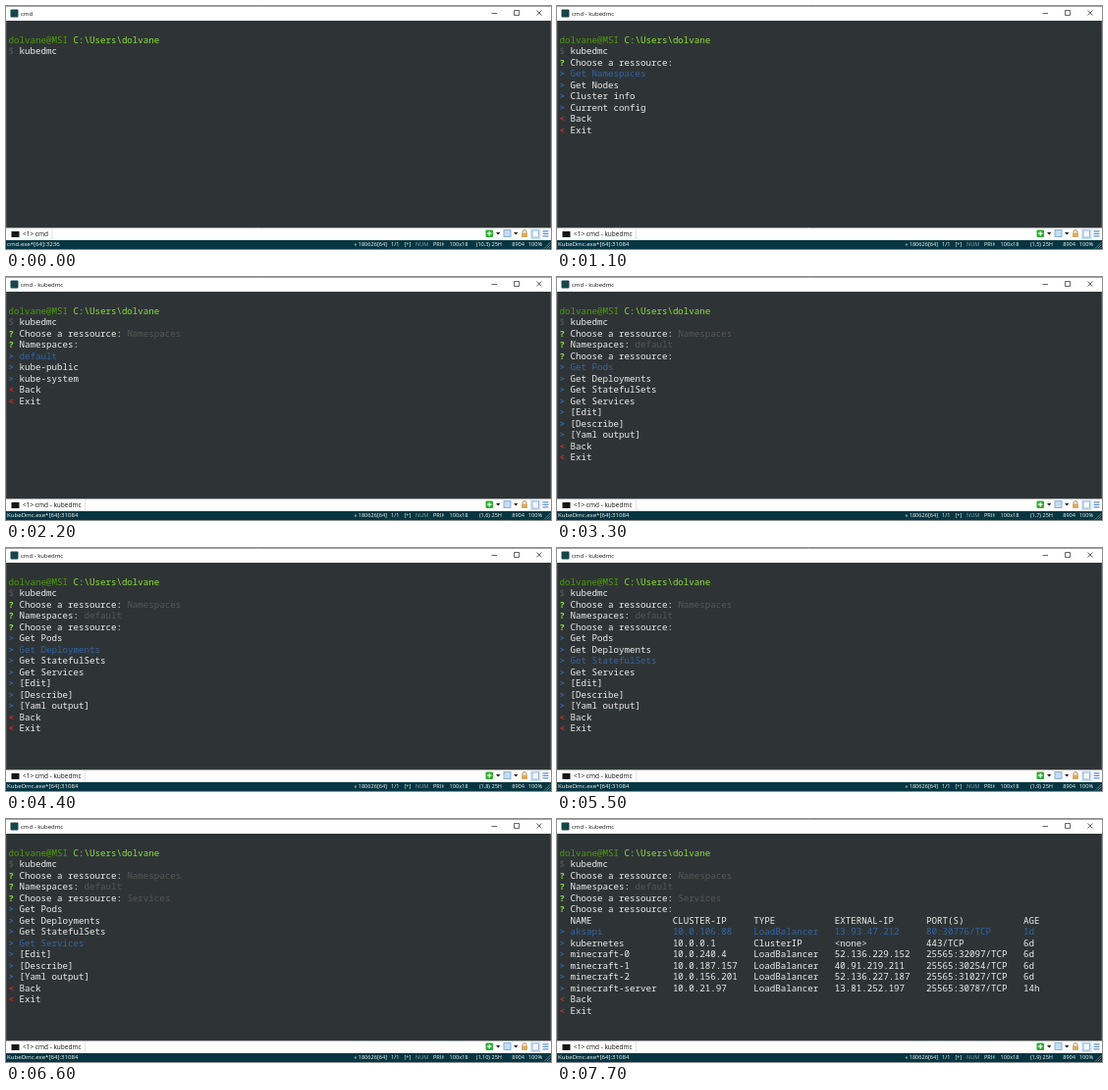
These frames come from a looping animation (555x248 px, 8000 ms). An HTML page:

```html
<!DOCTYPE html>
<html lang="en">
<head>
<meta charset="utf-8">
<title>Terminal menu</title>
<style>
  html, body { margin: 0; width: 100%; height: 100%; overflow: hidden; background: #2e3436; }
  svg { display: block; width: 100vw; height: 100vh; }
  text { white-space: pre; }
  .term { font: 500 9.16px "Noto Sans Mono", monospace; font-variant-ligatures: none; }
  .strong { font-weight: 700; }
  .ui { font-family: "Open Sans", sans-serif; fill: #111; }
  .status { font: 5.6px "Open Sans", sans-serif; }
  .status text:first-child { font-size: 6.1px; }
</style>
</head>
<body>
<svg viewBox="0 0 555 248" preserveAspectRatio="none">
  <rect width="555" height="248" fill="#2e3436"/>

  <!-- title bar -->
  <rect width="555" height="15" fill="#fff"/>
  <path d="M0 .5H555" stroke="#a5a5a5"/>
  <rect x="4.5" y="3.5" width="8" height="8" rx="1" fill="#17464b"/>
  <text id="title" class="ui" x="15" y="9.6" font-size="6"></text>
  <path d="M494.5 7.5h5.5M517.5 4.5h5v5h-5zM540.5 4.5l5 5m0-5l-5 5" fill="none" stroke="#333" stroke-width=".75"/>

  <g id="screen" class="term"></g>
  <path d="M.25 15V226M554.75 15V226" stroke="#777" stroke-width=".5"/>

  <!-- tab bar -->
  <rect y="226" width="555" height="13" fill="#fff"/>
  <path d="M0 226.5H555" stroke="#a5a5a5"/>
  <path id="tabEdge" stroke="#ddd" stroke-width=".8"/>
  <rect x="5.5" y="230" width="8" height="6" fill="#151515"/>
  <text id="tab" class="ui" x="17" y="235.3" font-size="6.5"></text>
  <rect x="488.5" y="228.5" width="7.5" height="7.5" rx="1" fill="#2fae2f"/>
  <path d="M490 232.2h4.5M492.25 230v4.5" stroke="#fff" stroke-width="1.2"/>
  <path d="M499 231h4.4l-2.2 2.4zM517 231h4.4l-2.2 2.4z" fill="#222"/>
  <rect x="507" y="228.5" width="7" height="7" fill="#c6dcf4" stroke="#7fa9d6" stroke-width=".9"/>
  <path d="M526 232v-1.5a2 2 0 0 1 4 0v1.5" fill="none" stroke="#b58f55"/>
  <rect x="525" y="231.5" width="6" height="4.5" fill="#d8ab62"/>
  <rect x="534" y="227.5" width="10.5" height="10.5" fill="#cfe5f8"/>
  <rect x="536" y="229" width="6.5" height="7" fill="#f5f9fe" stroke="#8fa8c6" stroke-width=".8"/>
  <path d="M546.5 229.8h6M546.5 232.3h6M546.5 234.8h6" stroke="#5a90cc" stroke-width="1.2"/>

  <!-- status bar -->
  <rect y="239" width="555" height="9" fill="#073642"/>
  <path d="M548 247.5l6.5-6.5M550.5 247.5l4-4M553 247.5l1.5-1.5" stroke="#7f979c" stroke-width=".7"/>
  <g id="status" class="status"></g>
</svg>

<script>
const $ = id => document.getElementById(id);
const SVG = "http://www.w3.org/2000/svg";
const GREEN = "#4e9a06", LIME = "#8ae234", GRAY = "#555753",
      WHITE = "#eeeeec", BLUE = "#3465a4", RED = "#d42a2a";
const STEP = 1100, LOOP = 8000;

// A terminal line is a list of [color, text, class] runs.
const mark = (color, symbol) => [color, symbol + " ", "strong"];
const ask = (question, answer = "") => [mark(LIME, "?"), [WHITE, question + ": "], [GRAY, answer]];
const choose = answer => ask("Choose a ressource", answer);
const menu = (items, selected) => [
  ...items.map((item, i) => [mark(BLUE, ">"), [i === selected ? BLUE : WHITE, item]]),
  ...["Back", "Exit"].map(item => [mark(RED, "<"), [WHITE, item]])
];

const columns = [19, 15, 15, 17, 18, 3];
const tableRow = cells => cells.split(" ").map((cell, i) => cell.padEnd(columns[i])).join("");

const prompt = [
  [[GREEN, "dolvane@MSI "], [LIME, "C:\\Users\\dolvane"]],
  [[GRAY, "$ "], [WHITE, "kubedmc"]]
];
const main = ["Get Namespaces", "Get Nodes", "Cluster info", "Current config"];
const namespaces = ["default", "kube-public", "kube-system"];
const resources = ["Get Pods", "Get Deployments", "Get StatefulSets", "Get Services",
                   "[Edit]", "[Describe]", "[Yaml output]"];
const services = [
  "aksapi 10.0.106.88 LoadBalancer 13.93.47.212 80:30776/TCP 1d",
  "kubernetes 10.0.0.1 ClusterIP <none> 443/TCP 6d",
  "minecraft-0 10.0.240.4 LoadBalancer 52.136.229.152 25565:32097/TCP 6d",
  "minecraft-1 10.0.187.157 LoadBalancer 40.91.219.211 25565:30254/TCP 6d",
  "minecraft-2 10.0.156.201 LoadBalancer 52.136.227.187 25565:31027/TCP 6d",
  "minecraft-server 10.0.21.97 LoadBalancer 13.81.252.197 25565:30787/TCP 14h"
].map(tableRow);
const header = [[WHITE, "  " + tableRow("NAME CLUSTER-IP TYPE EXTERNAL-IP PORT(S) AGE")]];

const inNamespace = [choose("Namespaces"), ask("Namespaces", "default")];
const pickResource = (selected, answer) => ({
  cursor: "1," + (7 + selected),
  lines: [...inNamespace, choose(answer), ...menu(resources, selected)]
});

const scenes = [
  { cursor: "10,3", lines: [], idle: true },
  { cursor: "1,5", lines: [choose(), ...menu(main, 0)] },
  { cursor: "1,6", lines: [choose("Namespaces"), ask("Namespaces"), ...menu(namespaces, 0)] },
  pickResource(0),
  pickResource(1),
  pickResource(2),
  pickResource(3, "Services"),
  { cursor: "1,9", lines: [...inNamespace, choose("Services"), choose(), header, ...menu(services, 0)] }
];

function addText(parent, x, y, runs, anchor = "start") {
  const text = document.createElementNS(SVG, "text");
  text.setAttribute("x", x);
  text.setAttribute("y", y);
  text.setAttribute("text-anchor", anchor);
  for (const [color, content, style = ""] of runs) {
    const span = document.createElementNS(SVG, "tspan");
    span.setAttribute("fill", color);
    span.setAttribute("class", style);
    span.textContent = content;
    text.append(span);
  }
  parent.append(text);
}

function draw({ cursor, lines, idle }) {
  const name = idle ? "cmd" : "cmd - kubedmc";
  $("title").textContent = name;
  $("tab").textContent = "<1> " + name;
  $("tabEdge").setAttribute("d", `M${idle ? 47 : 80.5} 227V239`);

  $("screen").replaceChildren();
  [...prompt, ...lines].forEach((runs, i) => addText($("screen"), 2.5, 37.8 + 11.5 * i, runs));

  $("status").replaceChildren();
  const status = (x, label, anchor, color = "#f4f8f8") =>
    addText($("status"), x, 245.2, [[color, label]], anchor);
  status(1, idle ? "cmd.exe*[64]:3236" : "KubeDmc.exe*[64]:31084");
  status(388, "« 180626[64]", "end");
  status(392, "1/1");
  status(405.5, "[+]");
  status(417, "NUM", "start", "#8d9fa3");
  status(435, "PRI‡");
  status(470.5, "100x18", "end");
  status(505, `(${cursor}) 25H`, "end");
  status(528, "8904", "end");
  status(546, "100%", "end");
}

let shown = -1;
function frame() {
  const index = Math.floor(performance.now() % LOOP / STEP);
  if (index !== shown) draw(scenes[shown = index]);
  requestAnimationFrame(frame);
}
frame();
</script>
</body>
</html>
```
